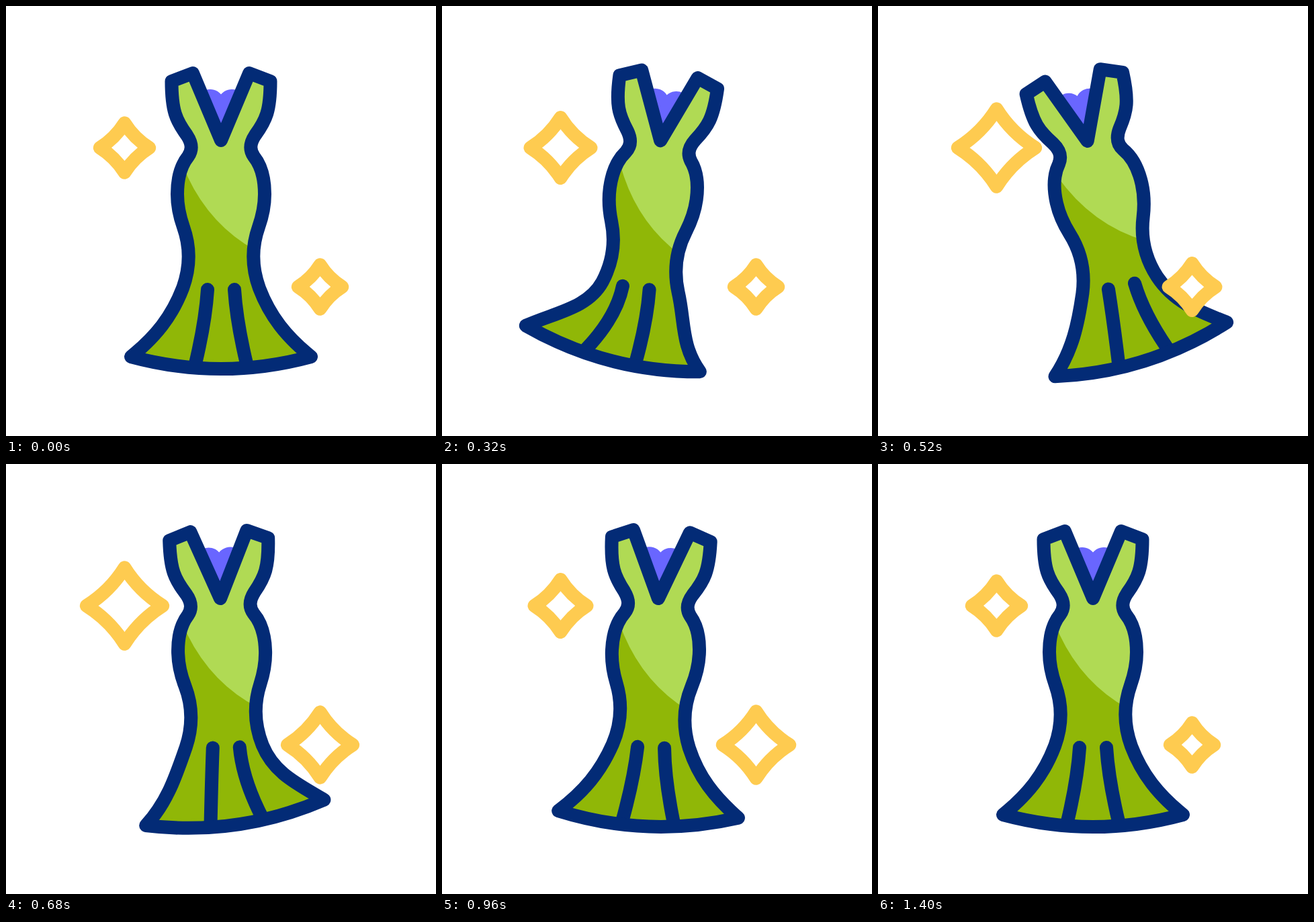
Animation, 640 px wide and 640 px high, one loop 1.6 s. Source, as an HTML page:

```html
<!DOCTYPE html>
<html lang="en">
<head>
<meta charset="utf-8">
<title>Dress</title>
<style>
  html, body { margin: 0; width: 100%; height: 100%; overflow: hidden; background: #fff; }
  svg { display: block; width: 100vw; height: 100vh; }
  .line { fill: none; stroke: #032b76; stroke-width: 20; stroke-linecap: round; stroke-linejoin: round; }
  .spark { fill: #fff; stroke: #fecb50; stroke-width: 20; stroke-linejoin: round; }
</style>
</head>
<body>
<svg viewBox="0 0 640 640">
  <defs><clipPath id="body"><path id="clip"/></clipPath></defs>
  <g id="dress">
    <path fill="#6966ff" d="M283 145A21 21 0 0 1 320 131.4A21 21 0 0 1 357 145L320 198Z"/>
    <path id="fill" fill="#90b707"/>
    <path clip-path="url(#body)" fill="#b0da54" d="M255 215Q288 318 372 364H430V80H200V215Z"/>
    <path id="pleats" class="line"/>
    <path id="outline" class="line"/>
  </g>
  <path id="spark1" class="spark" transform="translate(176.5 211)"/>
  <path id="spark2" class="spark" transform="translate(467.5 418)"/>
</svg>
<script>
const LOOP = 1600, STEP = 40, CENTER = 320, WAIST = 238, HEM = 522;
const $ = id => document.getElementById(id);

// Turning points as [time, value], eased in between
const TILT = [[0, 0], [290, 9.7], [465, -13.9], [820, 5], [1130, 0]];
const SWING = [[0, 0], [310, -28], [610, 20], [850, -12], [1050, 11], [1240, -17], [1400, 0]];
const GROW_1 = [[135, 36.7], [578, 58.7], [594, 58.7], [1052, 36.7]];
const GROW_2 = [[452, 32.7], [790, 53.9], [1390, 32.7]];

function at(keys, t) {
  const i = keys.findIndex(k => k[0] > t);
  if (i < 0) return keys[keys.length - 1][1];
  if (i === 0) return keys[0][1];
  const [t0, a] = keys[i - 1], [t1, b] = keys[i];
  const u = (t - t0) / (t1 - t0);
  return a + (b - a) * u * u * (3 - 2 * u);
}

// Left edge from shoulder to hem: a start point, then cubic triples
const SIDE = [
  [246.5, 112], [246.5, 156], [253, 170], [269, 192],
  [277, 204], [278, 214], [271, 224],
  [259, 239], [255, 258], [255, 280],
  [255, 296], [258, 312], [264, 329],
  [275, 360], [274, 390], [263, 420],
  [247, 462], [223, 492], [186, HEM]
];
const PLEAT = [[300, 422], [297, 469], [282, 532]];
const mirror = ([x, y]) => [2 * CENTER - x, y];

// The skirt's lower edge slides and turns; points above it stay or drag along a little
function bender(swing) {
  const a = -swing * (swing < 0 ? 0.25 : 0.5) * Math.PI / 180;
  const cos = Math.cos(a), sin = Math.sin(a), lift = 0.2 * Math.abs(swing);
  return ([x, y], drag) => {
    if (y < 470) return [x + drag * swing, y];
    const dx = x - CENTER, dy = y - HEM;
    return [CENTER + swing + dx * cos - dy * sin, HEM - lift + dx * sin + dy * cos];
  };
}

function drawDress(t) {
  const bend = bender(at(SWING, t));
  const put = (pts, drag = 0) =>
    pts.map(p => bend(p, drag).map(v => v.toFixed(2)).join(" ")).join(" ");

  const right = SIDE.map(mirror).reverse();
  const edge = `M${put(SIDE.slice(0, 1))}C${put(SIDE.slice(1))}`
    + `C${put([[275, 546], [365, 546], right[0]])}C${put(right.slice(1))}`
    + "L362 100L320 200L278 100Z";
  for (const id of ["clip", "fill", "outline"]) $(id).setAttribute("d", edge);

  const pleats = [PLEAT, PLEAT.map(mirror)]
    .map(p => `M${put(p.slice(0, 1), 0.22)}Q${put(p.slice(1), 0.22)}`);
  $("pleats").setAttribute("d", pleats.join(""));
  $("dress").setAttribute("transform", `rotate(${at(TILT, t)} ${CENTER} ${WAIST})`);
}

function star(r) {
  const c = r * 0.385;
  return `M0 ${-r}Q${c} ${-c} ${r} 0Q${c} ${c} 0 ${r}Q${-c} ${c} ${-r} 0Q${-c} ${-c} 0 ${-r}Z`;
}

function draw(t) {
  drawDress(t);
  $("spark1").setAttribute("d", star(at(GROW_1, t)));
  $("spark2").setAttribute("d", star(at(GROW_2, t)));
}

const start = performance.now();
function tick() {
  const t = (performance.now() - start) % LOOP;
  draw(Math.floor(t / STEP) * STEP);
  requestAnimationFrame(tick);
}
tick();
</script>
</body>
</html>
```
